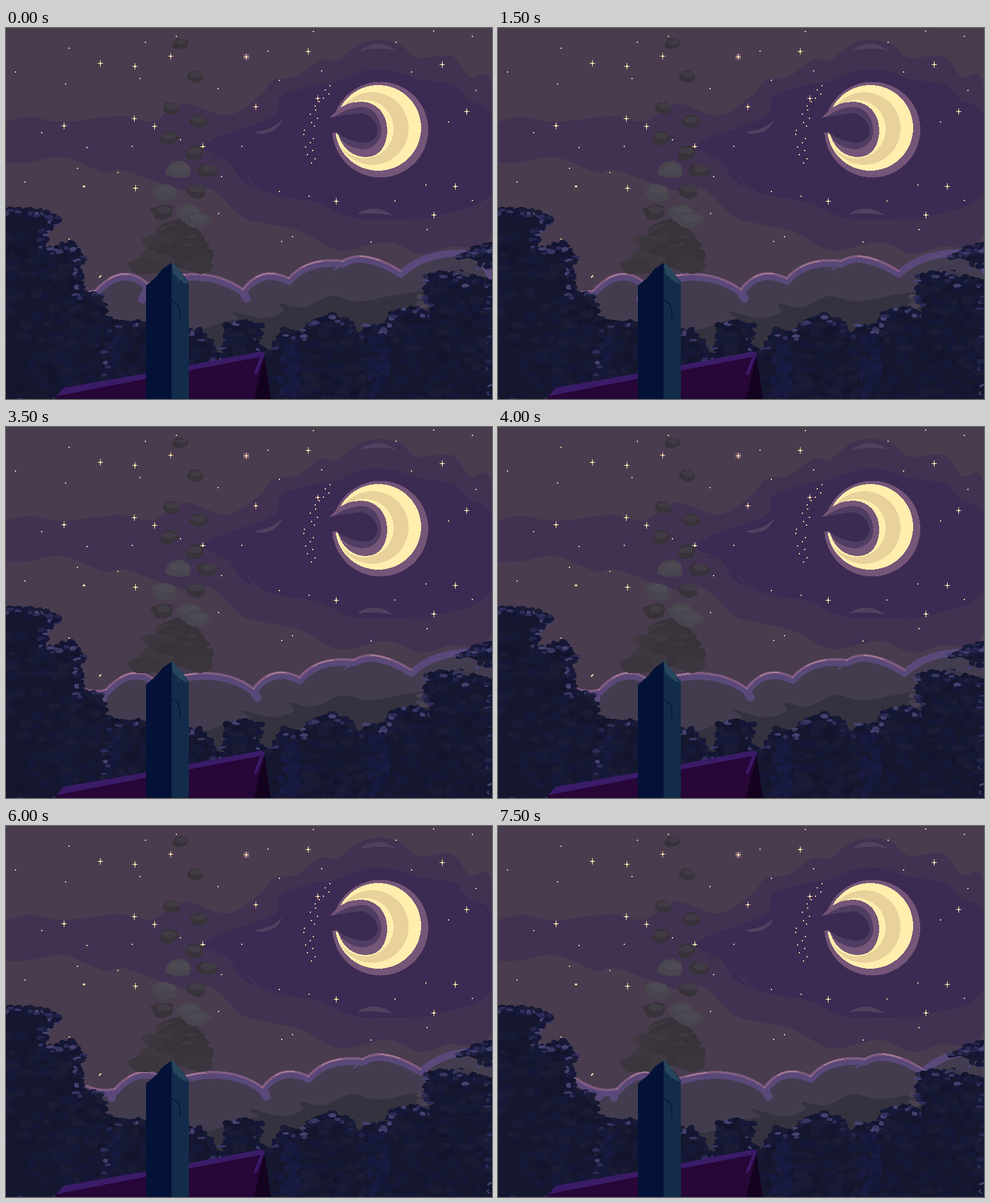
These frames come from a looping animation (816x624 px, 8000 ms). An HTML page:

```html
<!DOCTYPE html>
<html lang="en">
<head>
<meta charset="utf-8">
<title>Night chimney</title>
<style>
  html, body { margin: 0; width: 100%; height: 100%; overflow: hidden; background: #493c4e; }
  svg { display: block; width: 816px; height: 624px; }
</style>
</head>
<body>
<svg id="stage" viewBox="0 0 816 624" shape-rendering="crispEdges"></svg>
<script>
const stage = document.getElementById('stage');
const pairs = text => text.trim().split(/\s+/).map(p => p.split(',').map(Number));

let seed = 11;
const rand = () => (seed = (seed * 16807) % 2147483647) / 2147483647;
const between = (a, b) => a + (b - a) * rand();
const pick = list => list[Math.floor(rand() * list.length)];

function add(parent, tag, attrs) {
  const node = document.createElementNS('http://www.w3.org/2000/svg', tag);
  for (const key in attrs) node.setAttribute(key, attrs[key]);
  return parent.appendChild(node);
}
const shape = (parent, d, fill) => add(parent, 'path', { d, fill });
const poly = (parent, points, fill) => add(parent, 'polygon', { points, fill });
const disc = (cx, cy, r, fill) => add(stage, 'circle', { cx, cy, r, fill });
const rect = (x, y, width, height, fill) => add(stage, 'rect', { x, y, width, height, fill });
const line = (parent, d, stroke, width) => add(parent, 'path', {
  d, stroke, 'stroke-width': width, fill: 'none',
  'stroke-linecap': 'round', 'stroke-linejoin': 'round'
});

// Catmull-Rom curve through the points
function smooth(text) {
  const p = pairs(text), at = i => p[Math.max(0, Math.min(p.length - 1, i))];
  let d = 'M' + p[0];
  for (let i = 0; i < p.length - 1; i++) {
    const [a, b, c, e] = [at(i - 1), at(i), at(i + 1), at(i + 2)];
    const near = b.map((v, k) => v + (c[k] - a[k]) / 6);
    const far = c.map((v, k) => v - (e[k] - b[k]) / 6);
    d += ` C${near} ${far} ${c}`;
  }
  return d;
}

// Ragged ellipse
function blob(parent, x, y, w, h, fill, corners = 7) {
  const points = [];
  for (let i = 0; i < corners; i++) {
    const a = i / corners * Math.PI * 2, r = between(.75, 1.1) / 2;
    points.push(`${(x + Math.cos(a) * w * r).toFixed(1)},${(y + Math.sin(a) * h * r).toFixed(1)}`);
  }
  return poly(parent, points.join(' '), fill);
}

function drawSky() {
  const mid = '#423252', deep = '#3b2b52', glow = '#51405f';
  rect(0, 0, 816, 624, '#493c4e');
  shape(stage, smooth(`0,158 40,149 95,158 190,148 245,157 298,127 370,147 425,115 450,87 487,82
    530,53 556,55 592,28 626,20 662,27 690,50 748,47 778,82 816,99 816,343 740,368 695,380 640,360
    560,374 495,342 430,328 395,317 345,271 295,273 200,240 165,243 95,217 40,226 0,227`) + 'Z', mid);
  shape(stage, smooth(`328,202 355,184 450,148 462,115 522,95 555,90 605,71 650,72 690,85 752,96
    775,120 816,150 816,275 730,315 640,322 580,319 520,293 460,283 400,260 375,225 345,210`) + 'Z', deep);
  shape(stage, 'M593,39 Q622,15 656,38 Q625,31 593,39Z', glow);
  shape(stage, 'M416,175 Q450,171 464,153 Q456,178 424,178Z', glow);
  shape(stage, 'M590,313 Q618,293 649,315 Q620,310 590,313Z', glow);
  line(stage, 'M404,248 Q414,266 431,275', mid, 3);
  line(stage, 'M350,218 Q378,217 394,229 M682,325 L712,319', deep, 2);
}

function drawMoon() {
  const halo = '#755578', cream = '#ffeeae', deep = '#3b2b52';
  disc(628.5, 171, 80.5, halo);
  disc(625, 168, 72, cream);
  disc(615, 169, 61, '#e8d19a');
  disc(602, 170, 49, cream);
  shape(stage, `M553,141 C566,128 580,124 598,124 C624,125 640,146 640,172 C640,197 628,217 605,217
    C584,217 566,205 558,180 Q554,174 548,180 L544,150Z`, halo);
  shape(stage, `M549,151 Q572,133 600,133 C620,135 630,155 630,174 C630,192 615,204 598,204
    Q570,202 556,177Z`, '#4f3d62');
  shape(stage, `M543,151 Q570,146 598,143 C615,148 625,162 624,176 C622,188 612,193 600,193
    Q572,190 556,175 L543,177Z`, deep);
}

// Alternating notches and arch control points of the cloud bank
const bank = pairs(`50,392 100,452 150,440 195,390 238,428 335,392 398,438 428,396 475,419 505,383
  566,390 600,368 663,407 705,367 780,372 805,385 826,435`);

function drawClouds() {
  const g = add(stage, 'g', {});
  const body = '#433c4f', violet = '#594879', rose = '#805b80', pink = '#a67c94';
  const arches = [];
  for (let i = 0; i < bank.length - 2; i += 2) arches.push([bank[i], bank[i + 1], bank[i + 2]]);
  const bend = ([a, c, b]) => `M${a} Q${c} ${b}`;
  shape(g, 'M50,624 L50,392 ' + arches.map(([, c, b]) => `Q${c} ${b}`).join(' ') + ' V624Z', body);

  const rim = add(g, 'g', { transform: 'translate(0 7)' });
  arches.forEach(a => line(rim, bend(a), violet, 12));
  line(rim, 'M238,430 L229,449 M398,438 L404,448', violet, 14);
  line(rim, 'M120,442 v6 M145,442 v8', violet, 14);
  line(rim, 'M566,388 L551,400', violet, 3);

  const lit = add(g, 'g', { transform: 'translate(0 2)' });
  arches.slice(0, 6).forEach((a, i) => {
    line(lit, bend(a), rose, 4);
    if (i) add(line(lit, bend(a), pink, 2), 'title', {}).parentNode
      .setAttribute('stroke-dasharray', '0 30 34 400');
  });

  shape(g, smooth(`255,520 305,514 370,493 390,488 376,476 430,488 464,478 461,464 500,470 546,451
    592,460 655,449 725,441 816,445`) + ' L816,624 H255Z', '#35323f');
  line(g, 'M285,513 Q305,512 320,504', body, 4);
  return g;
}

function drawStars() {
  const cream = '#ffeeae', blush = '#f3b9a4';
  const dot = (x, y) => rect(Math.round(x), Math.round(y), 2, 2, '#f5e4b0');
  // loose dots on a jittered grid, then a trail beside the moon
  for (let x = 30; x < 816; x += 98)
    for (let y = 20; y < 350; y += 80) {
      const px = x + between(-40, 40), py = y + between(-30, 30);
      if (Math.hypot(px - 628, py - 171) > 88) dot(px, py);
    }
  for (let i = 0; i < 20; i++) {
    const t = i / 19;
    dot(540 - 36 * Math.sin(t * 2.2) + between(-9, 12), 96 + 130 * t);
  }
  const spark = (x, y, color) => {
    rect(x - 4, y, 9, 1, color);
    rect(x, y - 5, 1, 11, color);
    rect(x - 1, y - 1, 3, 3, cream);
  };
  pairs(`158,59 216,64 507,39 732,61 773,140 754,266 718,314 554,291 217,269 330,199 249,165
    215,152 97,164`).forEach(([x, y]) => spark(x, y, cream));
  rect(399, 44, 9, 9, '#755c72');
  pairs('276,47 403,48 419,132 523,118').forEach(([x, y]) => spark(x, y, blush));
  rect(129, 265, 4, 3, cream);
  line(stage, 'M157,419 L159,417', cream, 2);
}

function drawSmoke() {
  const dark = '#38323b', mid = '#413b45', light = '#4e4a53';
  const puff = (x, y, w, h, top, base) => {
    blob(stage, x, y, w, h, base, 9);
    blob(stage, x + w * .05, y - h * .14, w * .75, h * .5, top);
  };
  // puffs grow towards the chimney
  pairs('293,27 318,81 278,135 322,157 273,186 316,210 337,240 319,274 262,309').forEach(([x, y]) =>
    puff(x, y, 28 + y * .04, 19 + y * .03, mid, dark));
  for (let i = 0; i < 26; i++) {
    const t = (i + 1) / 26, spread = 14 + 42 * t;
    blob(stage, 286 + between(-1, 1) * spread, 335 + 66 * t, between(40, 62), between(26, 38),
      pick([dark, dark, '#3b353e', '#3e3840']), 9);
  }
  pairs('291,240 268,276 306,312 322,324').forEach(([x, y]) => puff(x, y, 46, 32, light, '#49454e'));
}

// Ragged foliage: silhouette, leaf strokes inside, moonlit tufts along its edge
let masses = 0;
function foliage(outline, lit) {
  const base = '#15172f', leaves = ['#13152f', '#161838', '#1a1b35', '#151737'];
  const tufts = ['#23244a', '#2d2c59', '#383763', '#444170'];
  const points = pairs(outline), id = 'mass' + masses++;
  const right = Math.max(...points.map(p => p[0])), left = Math.min(...points.map(p => p[0]));
  const top = Math.min(...points.map(p => p[1]));
  poly(stage, outline, base);
  add(add(stage, 'clipPath', { id }), 'polygon', { points: outline });
  const g = add(stage, 'g', { 'clip-path': `url(#${id})` });
  for (let n = (right - left) * (624 - top) / 240; n > 0; n--)
    blob(g, between(left, right), between(top, 624), between(14, 30), between(9, 18), pick(leaves), 6);
  for (let i = 0; i < points.length - 1; i++) {
    const [x0, y0] = points[i], [x1, y1] = points[i + 1];
    const count = Math.ceil(Math.hypot(x1 - x0, y1 - y0) / 7);
    for (let k = 0; k < count; k++) {
      const t = k / count, x = x0 + (x1 - x0) * t, y = y0 + (y1 - y0) * t;
      blob(stage, x + between(-3, 3), y + between(0, 6), between(10, 18), between(7, 13), pick(leaves));
      if (rand() < lit) blob(stage, x + between(-8, 4), y + between(1, 12),
        between(9, 19), between(5, 10), pick(tufts), 6);
    }
  }
}

function drawTrees() {
  foliage(`160,480 186,492 228,494 250,515 322,508 342,524 352,552 366,546 372,498 402,490 426,500
    422,532 441,545 470,504 496,517 518,489 545,481 578,493 590,514 612,499 640,502 652,474 690,469
    718,480 728,458 708,434 718,416 765,410 816,426 816,624 160,624`, .42);
  // bluer trunks in the distance
  for (const x of [182, 474, 625])
    for (let i = 0; i < 22; i++)
      blob(stage, x + between(-18, 18), between(520, 620), between(10, 19), between(12, 24),
        pick(['#171940', '#191b43', '#151739']));
  // pale leaves that fade into the cloud
  for (let i = 0; i < 26; i++) {
    const t = rand();
    blob(stage, 690 + 85 * t + between(-8, 14), 468 - 62 * t + between(-10, 12), 17, 9,
      pick(['#433c4f', '#4a4253', '#3b374a']));
  }
  foliage('718,480 706,444 712,416 738,410 760,414 780,424 816,424 816,624 690,624', .6);
  foliage('764,382 782,371 816,360 816,398 792,393', .75);
  foliage(`0,303 50,304 90,318 62,340 68,372 108,361 128,380 120,400 130,440 114,448 154,447
    164,470 174,520 160,624 0,624`, .55);
}

function drawHouse() {
  const ridge = '#3a1b68', teal = '#27465b';
  poly(stage, '82,624 96,608 433,546 433,560 416,624', '#270638');
  poly(stage, '434,552 445,624 416,624', '#14031f');
  poly(stage, '85,619 97,605 235,581 428,544 435,547 433,552 307,576 235,590', ridge);
  line(stage, 'M431,550 L419,581', ridge, 5);
  poly(stage, '235,624 235,433 251,420 263,405 279,394 279,624', '#041237');
  poly(stage, '278,394 290,405 307,428 307,624 278,624', '#132c4b');
  poly(stage, '278,394 290,405 307,431 297,427 281,414', teal);
  line(stage, 'M289,418 V429', teal, 1);
  line(stage, 'M279,458 L288,465 L292,474 V488', '#071a3b', 2);
}

drawSky();
drawMoon();
const clouds = drawClouds();
drawStars();
drawSmoke();
drawTrees();
drawHouse();

// Drift in hard half-second steps: slows until a third of the way, then gathers speed
const STEPS = 16;
const drift = i => {
  const u = i - 5;
  return Math.round(14.4 + 2 * u - .053 * u ** 2 + .0213 * u ** 3);
};
const frames = Array.from({ length: STEPS + 1 }, (_, i) => ({
  transform: `translate(${drift(Math.min(i, STEPS - 1))}px, 0px)`,
  offset: i / STEPS,
  easing: 'step-end'
}));
clouds.animate(frames, { duration: STEPS * 500, iterations: Infinity });
</script>
</body>
</html>
```
